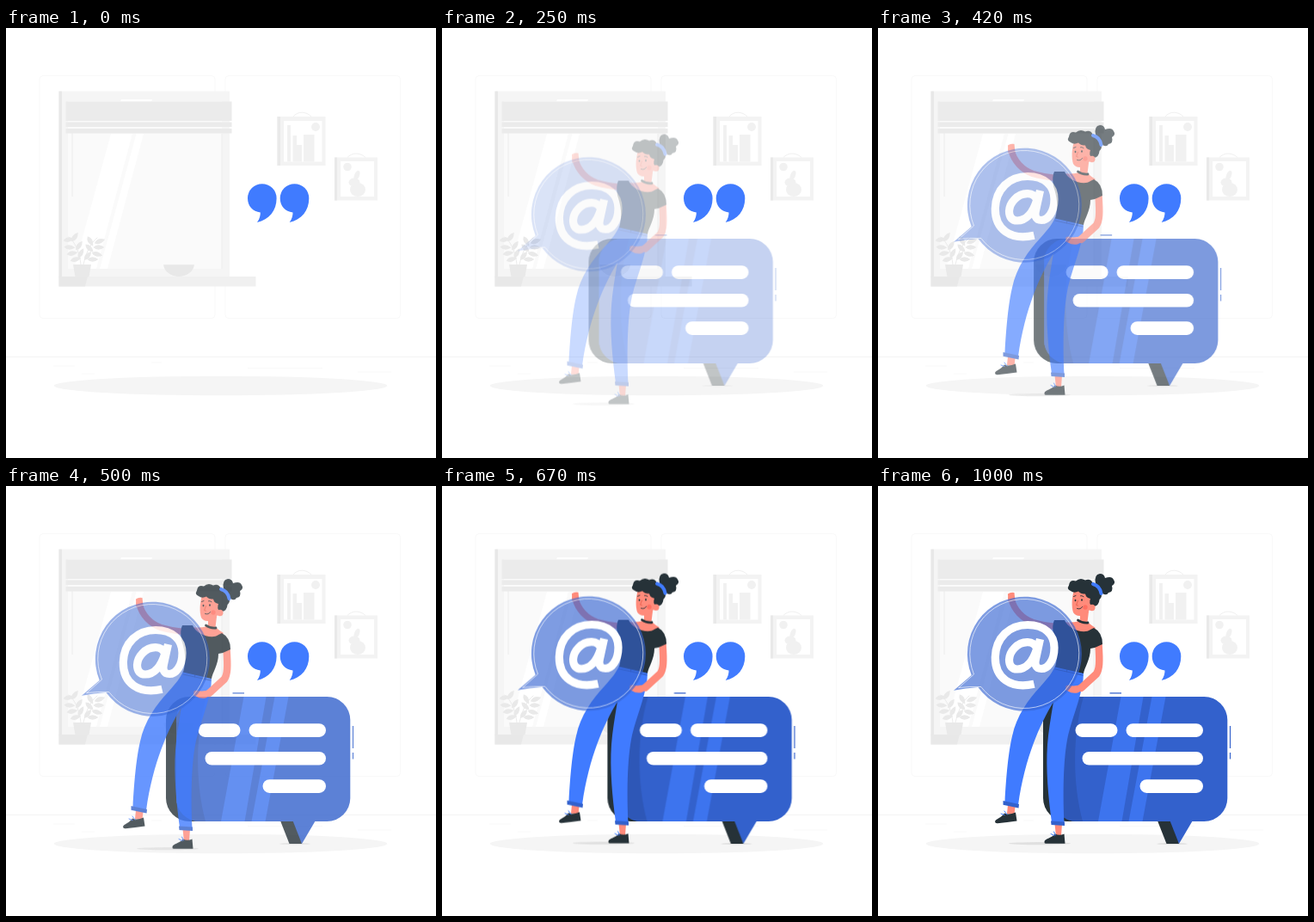
Write an HTML page that moves like this. It is 500 px wide and 500 px high and loops after 1040 ms.

```html
<!DOCTYPE html>
<html lang="en">
<head>
<meta charset="utf-8">
<title>Message bubbles</title>
<style>
  html, body { margin: 0; width: 100%; height: 100%; overflow: hidden; background: #fff; }
  svg { display: block; width: 100%; height: 100%; }
  /* The script scrubs the paused animations through --t. */
  .up, .right {
    animation: up 1s cubic-bezier(.36, -.01, .5, 1.38) calc(var(--t, 0) * -1ms) both paused;
  }
  .right { animation-name: right; }
  @keyframes up { from { opacity: 0; transform: translateY(30px); } to { opacity: 1; transform: none; } }
  @keyframes right { from { opacity: 0; transform: translateX(-30px); } to { opacity: 1; transform: none; } }
  .line { fill: none; stroke-linecap: round; stroke-linejoin: round; }
  .blue { fill: #407bff; }
  .deep { fill: #3361cc; }
  .dark { fill: #263238; }
  .skin { fill: #ff8b7b; }
</style>
</head>
<body>
<svg viewBox="0 0 500 500">
  <defs>
    <path id="leaf" d="M-6.5 0Q-1-5.5 6.5 0Q-1 5.5-6.5 0Z"/>
    <path id="quote" d="M281 198a16.8 16.8 0 0 1 33.6 0c0 14.500-8.500 24.500-22.600 28q4-5.500 3.800-11.500C287 213.500 281 207 281 198Z"/>
    <clipPath id="face"><rect x="204" y="245" width="202.300" height="145" rx="27"/></clipPath>
  </defs>

  <g id="room">
    <g fill="none" stroke="#f9f9f9">
      <rect x="39" y="55.500" width="204" height="282" rx="4"/>
      <rect x="255" y="55.500" width="203.500" height="282" rx="4"/>
      <path d="M0 382.400H500" stroke="#f3f3f3"/>
      <path d="M55 393H80M88 402H103M169 389H181M281 395.500H368M409 400H448"/>
    </g>

    <path fill="#f5f5f5" d="M61.500 73.500H260V290H61.500Z"/>
    <path fill="#e8e8e8" d="M61.500 73.500H65V290H61.500Z"/>
    <path fill="#fafafa" d="M72 85H251V280H72Z"/>
    <path fill="#fff" d="M122 123H147L105 280H79ZM151.500 123H160L118 280H109ZM134 83H170L169 85.500H133Z"/>
    <path fill="#eee" d="M250.500 123H251.500V280H250.500ZM76.500 122H77.700V196H76.500Z"/>
    <path fill="#ebebeb" d="M69.500 85.500H262.500V108H69.500ZM69.500 109.500H262.500V115H69.500ZM69.500 117H262.500V122.500H69.500Z"/>
    <path fill="#f0f0f0" d="M61.500 289H290.500V300.500H61.500Z"/>
    <path fill="#e8e8e8" d="M61.500 289H95L92 300.500H61.500ZM183 275.300H219C218 284 209 289 201 289S184 284 183 275.300Z"/>
    <g fill="#e9e9e9">
      <path d="M78 275H99L96.500 289.500H80.500Z"/>
      <path class="line" stroke="#ebebeb" d="M87 275C86 262 80 248 73 243M90 275C93 262 98 250 106 244"/>
      <use href="#leaf" transform="translate(80 243) rotate(-55)"/>
      <use href="#leaf" transform="translate(73 246) rotate(-10)"/>
      <use href="#leaf" transform="translate(85 253) rotate(-55)"/>
      <use href="#leaf" transform="translate(74 255) rotate(5)"/>
      <use href="#leaf" transform="translate(77 262) rotate(-10)"/>
      <use href="#leaf" transform="translate(87 262) rotate(-60)"/>
      <use href="#leaf" transform="translate(81 269) rotate(-15)"/>
      <use href="#leaf" transform="translate(98 248) rotate(60)"/>
      <use href="#leaf" transform="translate(109 248) rotate(-20)"/>
      <use href="#leaf" transform="translate(97 256) rotate(45)"/>
      <use href="#leaf" transform="translate(108 255) rotate(0)"/>
      <use href="#leaf" transform="translate(95 265) rotate(-50)"/>
      <use href="#leaf" transform="translate(106 263) rotate(15)"/>
      <use href="#leaf" transform="translate(101 269) rotate(0)"/>
    </g>

    <path class="line" stroke="#f0f0f0" d="M334 103C339 96.500 349 96.500 355 103M397 150.500C402 144.500 412 144.500 418 150.500"/>
    <path fill="#f3f3f3" d="M315.500 103H371.500V160H315.500ZM382 150.500H432V200.500H382Z"/>
    <path fill="#e9e9e9" d="M315.500 103H319V160H315.500ZM382 150.500H385V200.500H382Z"/>
    <path fill="#fff" d="M323 108H367.500V155.500H323ZM389 155H428V196H389Z"/>
    <g fill="#f1f1f1">
      <path d="M327 113H331V155.500H327ZM333.500 125H338V136H344V155.500H333.500ZM346 124H358.500V155.500H346Z"/>
      <circle cx="360" cy="115" r="5"/>
      <circle cx="397" cy="161.500" r="4.800"/>
      <ellipse cx="409" cy="188" rx="9" ry="8"/>
      <ellipse cx="405" cy="179.500" rx="6.500" ry="5"/>
      <ellipse cx="408" cy="171.500" rx="3" ry="6" transform="rotate(22 408 171.500)"/>
    </g>
    <ellipse cx="249.500" cy="416" rx="193.800" ry="11.300" fill="#f5f5f5"/>
  </g>

  <g class="blue">
    <use href="#quote"/>
    <use href="#quote" x="37.700"/>
  </g>

  <g id="message" class="right">
    <ellipse cx="342" cy="416" rx="18" ry="1.200" fill="#e0e0e0"/>
    <path class="dark" d="M324.500 388H345L350 416H335.500Z"/>
    <path class="deep" d="M339 388H366.500L350 416Z"/>
    <rect class="dark" x="192" y="245" width="120" height="145" rx="27"/>
    <g clip-path="url(#face)">
      <path class="deep" d="M200 245H407V390H200Z"/>
      <path fill="#3d74ee" d="M282.500 245H308.500L283.500 390H256ZM318.500 245H334.500L307.500 390H291.500Z"/>
      <path fill="#2e57b7" d="M200 245H239C226 290 226 345 238 390H200Z"/>
    </g>
    <g fill="#fff">
      <rect x="229.500" y="276.300" width="49" height="15.600" rx="7.800"/>
      <rect x="288.500" y="276.300" width="89.500" height="15.600" rx="7.800"/>
      <rect x="237.500" y="309" width="140.500" height="15.600" rx="7.800"/>
      <rect x="304.500" y="341.300" width="73.500" height="15.600" rx="7.800"/>
    </g>
    <path fill="none" stroke="#3361cc" stroke-width="1.200" d="M269.500 240.800H283M409.500 279V305M409.500 310V317.500"/>
  </g>

  <g id="woman" class="up">
    <ellipse cx="188" cy="415.700" rx="36" ry="1.600" fill="#e0e0e0"/>

    <path class="skin" d="M151 371L159.500 373L158.500 382L150 381ZM205.500 393H214L213 407H207Z"/>
    <path class="dark" d="M136 390C137 387 143 386 147 380.500Q152 383 160 379.500L161.500 389.500Q150 391 139 392.300Q136 392.500 136 390ZM193.500 413.500C194 410 201 410 206 404.500Q211 407 216.500 404.500L217.500 415.700H195Q193 415.700 193.500 413.500Z"/>
    <path class="line" stroke="#407bff" d="M143 381l4 1.500M147 378l3 4M201 404.500l4 2M204.500 402l2 4"/>

    <path class="blue" d="M206 209L239 217C239 240 227 265 221 290C215 318 215 360 216.500 392L202 391C198 362 195 329 197 301C198 286 201 269 204 251C188 278 171 315 163 371L147.500 367C149 337 152 307 156 291C161 267 175 248 189 233C197 224 203 217 206 209Z"/>
    <path class="deep" d="M145.500 366L164 370L163.500 374.500L145.500 370.700ZM201 389.500L217 390.500V395L201.500 394Z"/>
    <path class="line" stroke="#2b51ab" stroke-width=".9" d="M206 213L238 220M220 212l-.5 4M232 215l-.5 4"/>

    <path class="line" stroke="#ff8b7b" stroke-width="7.500" d="M155 131C158 144 168 154 180 158.500Q192 162 208 163.500"/>
    <path class="skin" d="M151 125.500Q154 123 158.500 124L159.500 134L151.500 135Z"/>

    <path class="skin" d="M235 145L245 146L243.500 158Q248 162 253 165L240 177L216 158Q232 160 235 155Z"/>
    <path class="line" stroke="#ff8b7b" stroke-width="8.500" d="M256.500 184C258 205 257.500 213 254 218.500L236 235"/>
    <path class="skin" d="M239 230Q229 234 221 231.500Q217 232 218.500 235Q217 238 221 238.500Q225 241.500 232 240.500L241 236Z"/>
    <path class="dark" d="M205 156L217 156C221 166 239 173 247 167L251 165Q261 170 261 184L252 188L247 189C247 202 240 211 239 218L206 210.500C210 196 208 185 204 173Q202 162 205 156Z"/>

    <path class="skin" d="M228 121C225 131 225 141 227 147Q231 153 239 150C247 147 251 137 250 121Z"/>
    <path class="dark" d="M224 122Q219 120 222 115.500Q223 108.500 230 110.500Q235 106 241 109.500Q247 107 250 113Q259 114 258 122Q262 128 257.500 132Q257 139 251 140L248 139Q245 136 247 131Q242 130 241 125.500Q236 126 233 122.500Q228 125 224 122Z"/>
    <path class="dark" d="M253 113Q251 103 258 102Q263 102 264 107Q272 104 274 109Q277 113 272 116Q274 123 268 124Q266 128 261 125Z"/>
    <path class="line" stroke="#407bff" stroke-width="4" stroke-linecap="butt" d="M250 114Q258 116 259.500 125"/>
    <circle class="skin" cx="248.800" cy="141.500" r="3.700"/>
    <circle cx="241" cy="141" r="2.700" fill="#ff6f61"/>
    <g class="dark">
      <ellipse cx="229.500" cy="133" rx=".9" ry="1.300"/>
      <ellipse cx="237" cy="132.500" rx=".9" ry="1.300"/>
    </g>
    <path class="line" stroke="#263238" stroke-width=".9" d="M227.500 128.500l2.500-1M235.500 127.700q2-.5 3.500 1M231.500 142.500q4 1.500 6-2"/>
    <path class="line" stroke="#e8604f" stroke-width=".9" d="M232.500 133.500l-2 5 2 .5"/>
    <path class="line" stroke="#263238" stroke-width="2.800" stroke-linecap="butt" d="M232.500 156Q237 159.500 244 159"/>
  </g>

  <g id="at" class="up">
    <path fill="#3664d2" fill-opacity=".64" d="M88 237.800L108.700 220A66.500 66.500 0 1 1 116.400 234Q102 235 88 237.800Z"/>
    <path class="line" stroke="#fff" stroke-width=".8" stroke-opacity=".8" d="M94 234.500L111.500 219A63.500 63.500 0 1 1 119.800 233.500Q107 233 94 234.500Z"/>
    <path fill="none" stroke="#fff" stroke-width="9.200" stroke-linejoin="round" d="M181.500 230.300C154 236.500 136 223 136.300 199C137 176 153 161.500 174 161.500C194 161.500 205 173 205 188C205 204 197 212.500 190 212.500C183 212.500 182 207 183.500 201L188.500 178M185 190C183.500 184 179 181.500 173.500 181.700C162 182 153 192 152.500 202C152.500 209.500 156 213 162 213C172 213 180 204 184.500 190"/>
  </g>
</svg>
<script>
  const LOOP = 1040, FPS = 24, LEAD = 30;
  const root = document.documentElement;

  function draw() {
    const step = Math.floor((performance.now() % LOOP + 5) * FPS / 1000);
    const t = step < 2 ? 0 : step * 1000 / FPS + LEAD;
    root.style.setProperty('--t', t.toFixed(1));
    requestAnimationFrame(draw);
  }
  draw();
</script>
</body>
</html>
```
